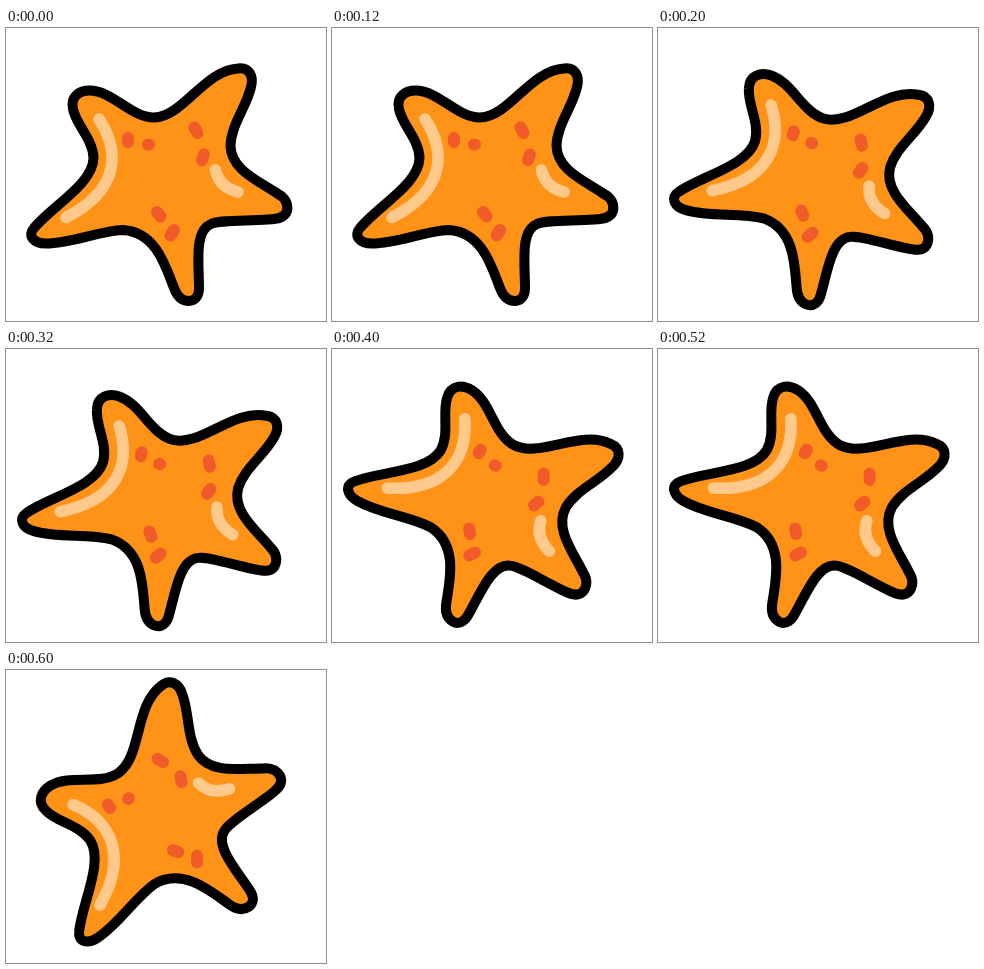
Write an HTML page that moves like this. It is 320 by 293 pixels and loops after 800 ms.

```html
<!DOCTYPE html>
<html lang="en">
<head>
<meta charset="utf-8">
<title>Starfish</title>
<style>
  html, body { margin: 0; width: 100%; height: 100%; overflow: hidden; background: #fff; }
  svg { display: block; width: 100%; height: 100%; }
  path { fill: none; stroke-linecap: round; stroke-linejoin: round; }
  .body { fill: #ff9318; stroke: #000; stroke-width: 10; }
  .shine { stroke: #ffc98b; stroke-width: 11.6; }
  .spots { stroke: #f15a29; stroke-width: 12; }
</style>
</head>
<body>
<svg viewBox="0 0 320 293">
  <g id="star">
    <path class="body" d="M232 40.5C243 39 248 48 245 59C240 80 225 97 224.5 118
      C225 142 253 153 272 166C279 169.5 282.5 176 281 183C279 190 271 191 262 191.5
      C236 193 214 192 205 196C188 203 193 235 193 260C193 268 189 273 183 273
      C176 273 171 268 168 260C159 236 149 204 117 202C92 203 66 215.5 40 215.5
      C28 215.5 21 208 28 200C46 178 87 156 87.5 130C87 111 70 97 67 81
      C64 68 74 62 85 62.5C108 64 125 89.5 148 89.5C177 89 198 42.5 232 40.5Z"/>
    <path class="shine" d="M93 91C114 123 114 162 60 189.5M209.5 142Q213 159 232 164"/>
    <path class="spots" d="M122 110V114M142 116.5H143M188.5 99.5L191.5 105
      M198 126.5L196 132M151 184L154.5 188.5M168 202L164.5 207.5"/>
  </g>
</svg>
<script>
  const star = document.getElementById('star');
  const angles = [0, 16, 29.7, -33.5];
  const hold = 200;

  // The star snaps from pose to pose around its centre.
  function draw(now) {
    const angle = angles[Math.floor(now / hold) % angles.length];
    star.setAttribute('transform', `rotate(${angle} 152.7 155.7)`);
    requestAnimationFrame(draw);
  }
  draw(0);
</script>
</body>
</html>
```
